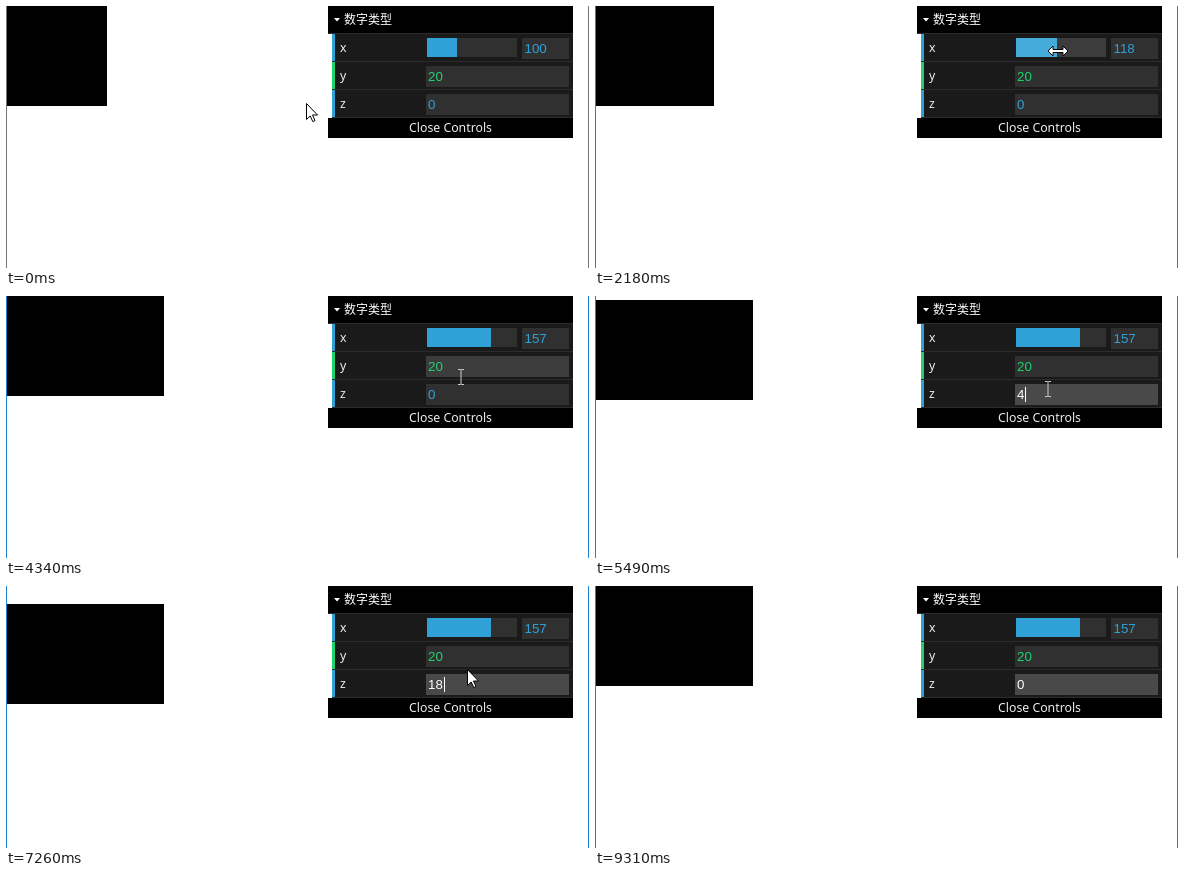
Recreate the animation shown at these times as an HTML page. Size 583 px wide and 262 px high, loop 9330 ms.

```html
<!DOCTYPE html>
<html lang="zh">
<head>
<meta charset="utf-8">
<style>
  html, body { margin: 0; width: 100%; height: 100%; overflow: hidden; background: #fff; }
  svg { display: block; }
  .label { font: 12.3px "Noto Sans", "Open Sans", sans-serif; fill: #eee; }
  .title { font: 12px "Noto Sans CJK SC", "Noto Sans CJK", sans-serif; fill: #fff; }
  .value { font: 13.333px "Liberation Sans", Arial, sans-serif; }
</style>
</head>
<body>
<svg width="583" height="262" viewBox="0 0 583 262">
  <rect width="583" height="262" fill="#fff"/>
  <g id="edges"><rect width="1" height="262"/><rect x="582" width="1" height="262"/></g>
  <rect id="box" x="1" height="100"/>

  <g shape-rendering="crispEdges">
    <path d="M322 0h245v27h-245zM322 112h245v20h-245z"/>
    <path d="M329 28h238v84h-238z" fill="#1a1a1a"/>
    <path d="M322 27h245v1h-245zM326 55h241v1h-241zM326 83h241v1h-241zM326 111h241v1h-241z" fill="#2c2c2c"/>
    <path d="M326 28h3v27h-3zM326 84h3v27h-3z" fill="#2fa1d6"/>
    <path d="M326 56h3v27h-3z" fill="#1ed36f"/>
    <rect id="track" x="421" y="32" width="90" height="19"/>
    <rect id="fill" x="421" y="32" height="19"/>
    <rect x="516" y="32" width="47" height="21" fill="#303030"/>
    <rect id="yField" x="420" y="60" width="143" height="21"/>
    <rect id="zField" x="420" y="88" width="143" height="21"/>
  </g>
  <path d="M328 12h6l-3 3.5z" fill="#fff"/>
  <text class="title" x="338" y="18">数字类型</text>
  <text class="label" x="334" y="46">x</text>
  <text class="label" x="334" y="74">y</text>
  <text class="label" x="334" y="102">z</text>
  <text class="label" x="444.5" y="126" text-anchor="middle">Close Controls</text>
  <text class="value" id="xText" x="518.5" y="47" fill="#2fa1d6"></text>
  <text class="value" x="422" y="75" fill="#1ed36f">20</text>
  <text class="value" id="zText" x="422" y="103"></text>
  <rect id="caret" y="91" width="1" height="15" fill="#fff"/>

  <g id="cursor">
    <path id="arrow" d="M.5 .5V16.5L4.2 13L6.8 18.6L9 17.6L6.5 12H11.5Z" fill="#fff" stroke="#000"/>
    <path id="resize" d="M-10 0L-5-5V-1.5H5V-5L10 0L5 5V1.5H-5V5Z" fill="#fff" stroke="#000"/>
    <path id="beam" d="M-3-7.5h2.5l.5.5l.5-.5h2.5M0-7V7M-3 7.5h2.5l.5-.5l.5.5h2.5" fill="none" stroke="#ccc"/>
  </g>
</svg>
<script>
const LOOP = 9330;
const el = Object.fromEntries([...document.querySelectorAll('[id]')].map(e => [e.id, e]));

// Bursts of picture changes: start, end, number of steps
const bursts = [
  [0, 0, 1], [120, 1120, 8], [1420, 2330, 7], [2640, 3480, 7], [3760, 4640, 7], [4920, 4920, 1],
  [5190, 6150, 8], [6450, 7380, 8], [7530, 7920, 4], [8200, 9160, 8], [9310, 9310, 1]
];

// Keys: time, value...
const xKeys = [[1277, 100], [1870, 172], [2330, 100], [2640, 112], [3060, 166], [3480, 109], [4050, 157]];
const zKeys = [[5050, 0], [6150, 14], [6700, 0], [7110, 21], [7247, 18], [7530, 0], [7790, 23], [8500, 0]];
const cursorKeys = [
  [0, 300, 97], [980, 451, 47], [4050, 486, 45], [4347, 455, 81], [4640, 452, 97], [5050, 452, 97],
  [6150, 454, 83], [6700, 457, 97], [7110, 460, 78], [7247, 461, 83], [7530, 452, 97],
  [7790, 452, 74], [8500, 455, 97], [9160, 535, 257]
];

function snap(t) {
  const [start, end, steps] = bursts.findLast(b => b[0] <= t);
  if (steps === 1) return start;
  const gap = (end - start) / (steps - 1);
  const step = Math.min(steps - 1, Math.floor((t - start + 10) / gap));
  return start + step * gap;
}

function track(keys, t) {
  const next = keys.findIndex(k => k[0] > t);
  if (next === 0) return keys[0].slice(1);
  if (next < 0) return keys.at(-1).slice(1);
  const a = keys[next - 1], b = keys[next];
  const p = (t - a[0]) / (b[0] - a[0]);
  const eased = p * p * (3 - 2 * p);
  return a.slice(1).map((v, i) => v + (b[i + 1] - v) * eased);
}

const set = (node, attrs) => {
  for (const name in attrs) node.setAttribute(name, attrs[name]);
};
const show = (node, on) => set(node, { visibility: on ? 'visible' : 'hidden' });

function draw(time) {
  const t = snap(time);
  const x = Math.floor(track(xKeys, t)[0] + 0.01);
  const z = Math.round(track(zKeys, t)[0]);
  const sliderWidth = Math.round((x - 50) * 0.6);
  const dragging = t >= 980 && t < 4100;
  const focused = t >= 4900;

  let [cx, cy] = track(cursorKeys, t).map(Math.round);
  if (dragging) {
    cx = 421 + sliderWidth + (x > 100 ? 1 : 0);
    cy = x > 100 ? 45 : 47;
  }
  const inside = (left, top, right, bottom) => cx >= left && cx <= right && cy >= top && cy <= bottom;
  const onSlider = dragging || inside(421, 32, 511, 51);
  const onY = inside(420, 60, 563, 81);
  const onZ = inside(420, 88, 563, 109);

  set(el.edges, { fill: t >= 970 ? '#1883d7' : '#7d7472' });
  set(el.box, { y: z, width: x });
  set(el.track, { fill: onSlider ? '#3c3c3c' : '#303030' });
  set(el.fill, { width: sliderWidth, fill: onSlider ? '#44abda' : '#2fa1d6' });
  set(el.yField, { fill: onY && !focused ? '#3c3c3c' : '#303030' });
  set(el.zField, { fill: focused ? '#494949' : onZ ? '#3c3c3c' : '#303030' });
  el.xText.textContent = x;
  el.zText.textContent = z;
  set(el.zText, { fill: focused ? '#fff' : '#2fa1d6' });
  set(el.caret, { x: 423 + Math.round(String(z).length * 7.42) });
  show(el.caret, focused && t < 9130);

  const kind = t >= 9300 ? null : onSlider ? el.resize : onY || onZ ? el.beam : el.arrow;
  for (const shape of [el.arrow, el.resize, el.beam]) show(shape, shape === kind);
  set(el.cursor, { transform: `translate(${cx} ${cy})` });
}

const begin = performance.now();
function frame() {
  draw((performance.now() - begin) % LOOP);
  requestAnimationFrame(frame);
}
frame();
</script>
</body>
</html>
```
